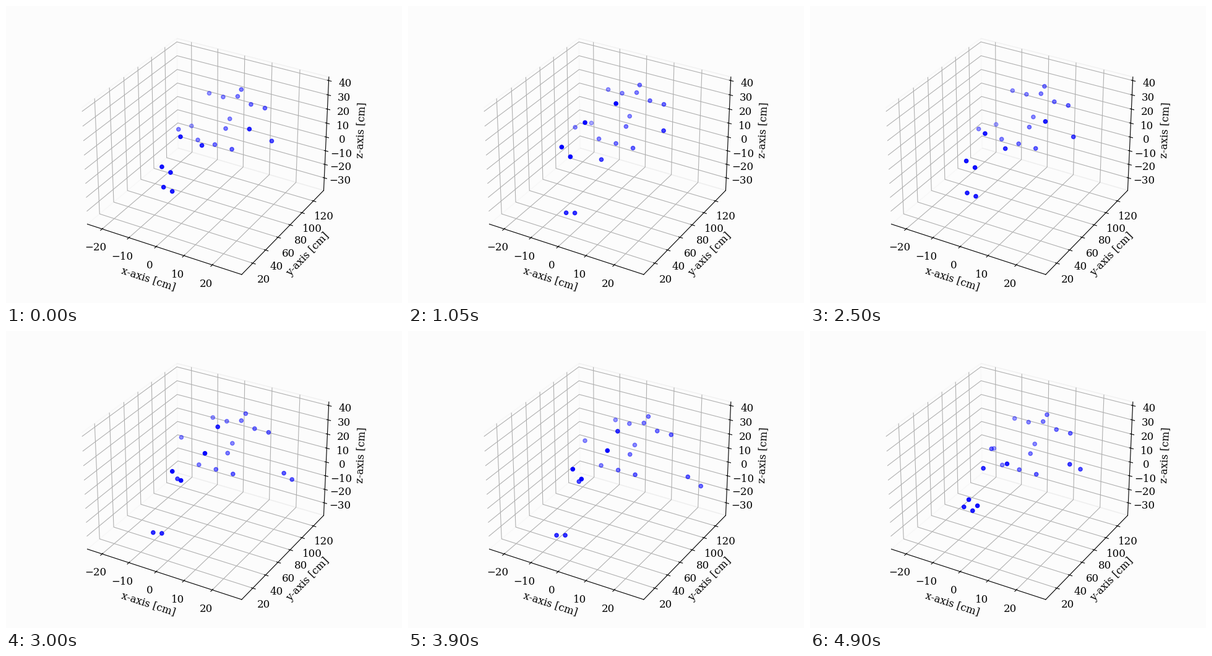
Animation, 640 px wide and 480 px high, one loop 4950 ms. Source, as a matplotlib script:

```python
import numpy as np
import matplotlib.pyplot as plt
from matplotlib.animation import FuncAnimation

W, H, DPI = 640, 480, 100
FRAMES, INTERVAL = 99, 50
STRIDES = 6             # gait cycles per loop
BACK_SWING = 78         # frame with the right arm furthest back
LEFT, RIGHT = -1, 1
PAPER = "#fcfcfc"

plt.rcParams.update({"font.family": "DejaVu Serif", "font.size": 12})


def vec(x, y):
    return np.array([x, y], float)


def torso(swing, sink):
    """Head, chest, shoulder row and hip row, swaying with the stride."""
    lean = vec(6, 0) * swing + vec(0, 1) * sink
    head = vec(381, 132) + lean * 1.2
    chest = vec(362, 180.5) + lean * .7
    shoulders = [vec(329, 138.5) + lean, vec(419, 162.5) + lean]
    hips = [vec(310, 215.5) + lean * .3, vec(365, 230.5) + lean * .3]
    return head, chest, shoulders, hips


def arm(shoulder, side, phase):
    """Elbow and wrist; the forearm folds up and inward as it comes forward."""
    back = np.cos(phase)
    elbow = shoulder + vec(-12, 50) + side * vec(25, 5) + back * vec(14, 13)
    fold = vec(0, -22) + side * vec(-50, -8)
    wrist = elbow + vec(-10, -9) + side * vec(-19, -6) - back * fold
    return [(elbow, .53 + .15 * side - .06 * back),
            (wrist, .7 + .1 * side - .23 * back)]


def leg(side, phase):
    """Knee, ankle and toe; raised in front at phase 0, landing past half."""
    lift, push = np.cos(phase), np.sin(phase)
    turn = phase / (2 * np.pi) % 1
    land = np.exp(-((turn - .62) / .06) ** 2)
    knee = vec(299, 218) + side * vec(18, 3) + lift * vec(5, -28)
    ankle = (vec(267, 284) + side * vec(8, 0) + lift * vec(5, -45)
             + push * vec(-6, 9) + land * vec(-12, 45))
    toe = ankle + vec(-14, -8) + lift * vec(0, -8)
    return [(knee, .85 + .14 * lift), (ankle, .9 + .1 * lift),
            (toe, .9 + .1 * lift)]


def pose(n):
    """Marker positions in stage pixels and their depth opacity."""
    phase = 2 * np.pi * STRIDES * (n - BACK_SWING) / FRAMES
    swing = np.cos(phase)
    sink = -5 * np.cos(2 * np.pi * (n - 32) / FRAMES)
    head, chest, shoulders, hips = torso(swing, sink)

    dots = [(head, .5), (chest, .45)]
    for f in np.linspace(0, 1, 5):
        neck = (f == .5) * vec(1, -7)
        row = shoulders[0] * (1 - f) + shoulders[1] * f
        dots.append((row + neck, .4 + .17 * f))
    for f in np.linspace(0, 1, 3):
        dots.append((hips[0] * (1 - f) + hips[1] * f, .47 + .13 * f))
    belly = chest * .6 + (hips[0] + hips[1]) * .2 + vec(3, -1)
    dots.append((belly, .5))

    # The left arm runs a little ahead of an exact half cycle.
    dots += arm(shoulders[0], LEFT, phase + 1.16 * np.pi)
    dots += arm(shoulders[1], RIGHT, phase)
    dots += leg(LEFT, phase + np.pi) + leg(RIGHT, phase)

    dots.sort(key=lambda d: d[1])
    spots, alpha = zip(*dots)
    return np.array(spots) + .3, np.clip(alpha, .3, 1)


fig = plt.figure(figsize=(W / DPI, H / DPI), dpi=DPI, facecolor=PAPER)

# Empty 3D box with unfilled panes
ax = fig.add_axes([18 / W, 18 / H, 604 / W, 444 / H], projection="3d")
ax.set_facecolor(PAPER)
ax.set(xlim=(-25.6, 30.2), ylim=(3.1, 138.4), zlim=(-39.4, 42.5),
       xticks=range(-20, 21, 10), yticks=range(20, 121, 20),
       zticks=range(-30, 41, 10),
       xlabel="x-axis [cm]", ylabel="y-axis [cm]", zlabel="z-axis [cm]")
for axis in (ax.xaxis, ax.yaxis, ax.zaxis):
    axis.pane.fill = False

# Flat layer in stage pixels for the markers
layer = fig.add_axes([0, 0, 1, 1])
layer.set(xlim=(0, W), ylim=(H, 0))
layer.axis("off")
marks = layer.scatter(*pose(0)[0].T, s=20, color="blue")


def draw(n):
    spots, alpha = pose(n)
    rgba = np.zeros((len(alpha), 4))
    rgba[:, 2] = 1
    rgba[:, 3] = alpha
    marks.set_offsets(spots)
    marks.set_facecolor(rgba)
    marks.set_edgecolor(rgba)
    return marks,


anim = FuncAnimation(fig, draw, frames=FRAMES, interval=INTERVAL,
                     repeat=True, repeat_delay=0)
plt.show()
```
